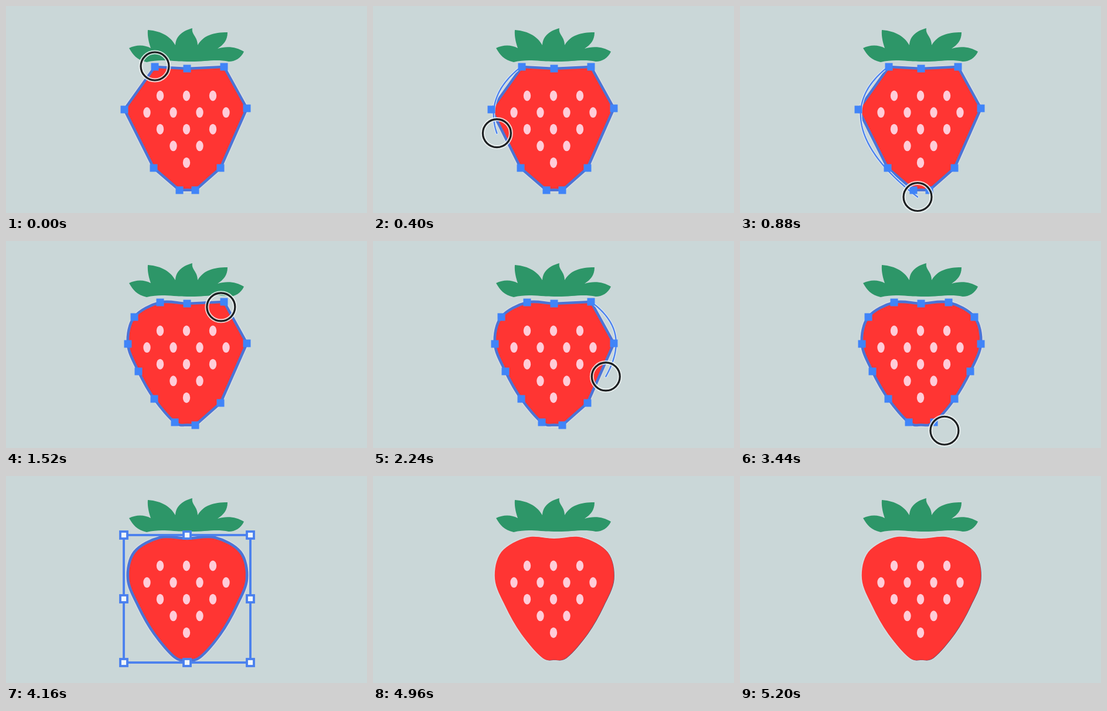
Write an HTML page with a canvas that moves like this. It is 616 by 354 pixels and loops after 5280 ms.

```html
<!DOCTYPE html>
<html lang="en">
<head>
<meta charset="utf-8">
<title>Smoothing a strawberry</title>
<style>
html, body { margin: 0; width: 100%; height: 100%; overflow: hidden; background: #cad7d8; }
canvas { display: block; width: 616px; height: 354px; filter: blur(0.6px); }
</style>
</head>
<body>
<canvas id="stage" width="616" height="354"></canvas>
<script>
const ctx = document.getElementById('stage').getContext('2d');
const LOOP = 5280, STEP = 80;
const PAPER = '#cad7d8', BLUE = '#4a80ee', RED = '#ff3533', GREEN = '#2d9668', SEED = '#ffccd8';

// Moments in the loop, in ms
const LEFT_DONE = 1040, RIGHT_DONE = 2960, BOX_ON = 4000, BOX_OFF = 4960;

// Cursor legs: eased travel along one cubic each
const leg = (start, end, ...curve) => ({ start, end, curve });
const sweepLeft = leg(0, 800, [254, 103], [160, 175], [218, 262], [303, 326.5]);
const goUp = leg(1120, 1600, [303, 326.5], [310, 230], [350, 140], [372, 104]);
const sweepRight = leg(1680, 2640, [372, 104], [455, 165], [405, 235], [326, 327]);
const leave = leg(3120, 3920, [326, 327], [317, 341], [380, 330], [645, 105]);
const legs = [sweepLeft, goUp, sweepRight, leave];

// Anchors run clockwise from the top centre; the smooth halves mirror each other
const TOP = [309, 107], BOTTOM = [309, 314.5];
const rough = {
  right: [[372, 104], [411, 175], [366, 277], [323, 315]],
  left: [[296, 315], [252, 277], [202, 177], [254, 104]]
};
const smoothRight = [[356, 105], [400, 130], [411, 176], [393, 223], [366, 270], [331, 310]];
const smooth = {
  right: smoothRight,
  left: smoothRight.map(([x, y]) => [619 - x, y]).reverse()
};

const leaves = new Path2D(`M210 72 C222 66 236 66 247 72 C244 63 241 52 242 41
  C267 43 281 53 289 67 C290 50 303 42 318 38 C316 49 327 52 327 67
  C337 50 354 45 378 45 C378 59 371 66 361 73 C377 68 393 70 406 78
  C401 89 391 95 380 95 C357 90 337 96 309 95 C283 95 265 90 240 96
  C223 92 217 84 210 72Z`);

function alongLeg({ start, end, curve: [a, b, c, d] }, t) {
  const p = Math.min(1, Math.max(0, (t - start) / (end - start)));
  const u = p * p * (3 - 2 * p), v = 1 - u;
  return [0, 1].map(i =>
    v * v * v * a[i] + 3 * v * v * u * b[i] + 3 * v * u * u * c[i] + u * u * u * d[i]);
}

function cursorAt(t) {
  return alongLeg(legs.findLast(l => t >= l.start), t);
}

function addCurve(path, pts) {
  for (let i = 0; i < pts.length - 1; i++) {
    const a = pts[i], b = pts[i + 1];
    // Level tangents where the two halves meet
    const before = pts[i - 1] || [2 * a[0] - b[0], b[1]];
    const after = pts[i + 2] || [2 * b[0] - a[0], a[1]];
    path.bezierCurveTo(
      a[0] + (b[0] - before[0]) / 6, a[1] + (b[1] - before[1]) / 6,
      b[0] - (after[0] - a[0]) / 6, b[1] - (after[1] - a[1]) / 6, ...b);
  }
}

function bodyPath(leftSmooth, rightSmooth) {
  const path = new Path2D();
  path.moveTo(...TOP);
  if (rightSmooth) addCurve(path, [TOP, ...smooth.right, BOTTOM]);
  else rough.right.forEach(p => path.lineTo(...p));
  path.lineTo(...BOTTOM);
  if (leftSmooth) addCurve(path, [BOTTOM, ...smooth.left, TOP]);
  else rough.left.forEach(p => path.lineTo(...p));
  path.closePath();
  return path;
}

function stroke(path, color, width) {
  ctx.strokeStyle = color;
  ctx.lineWidth = width;
  ctx.stroke(path);
}

function fill(path, color) {
  ctx.fillStyle = color;
  ctx.fill(path);
}

function drawSeeds() {
  ctx.fillStyle = SEED;
  [3, 4, 3, 2, 1].forEach((count, row) => {
    for (let i = 0; i < count; i++) {
      ctx.beginPath();
      ctx.ellipse(308 + 45 * (i - (count - 1) / 2), 153.5 + 28.6 * row, 6.2, 9, 0, 0, 7);
      ctx.fill();
    }
  });
}

function drawTrail(sweep, t) {
  const path = new Path2D();
  for (let s = sweep.start; s <= Math.min(t, sweep.end); s += 10) path.lineTo(...alongLeg(sweep, s));
  stroke(path, '#d8e6f1', 5);
  stroke(path, BLUE, 2.3);
}

function drawNodes(leftSmooth, rightSmooth) {
  const left = (leftSmooth ? smooth : rough).left;
  const right = (rightSmooth ? smooth : rough).right;
  ctx.fillStyle = '#4084f8';
  for (const [x, y] of [TOP, ...right, ...left]) ctx.fillRect(x - 6.5, y - 6.5, 13, 13);
}

function drawBox() {
  ctx.strokeStyle = BLUE;
  ctx.lineWidth = 3.8;
  ctx.strokeRect(201, 101, 216, 218);
  ctx.fillStyle = '#f1f7fb';
  for (const x of [201, 309, 417]) for (const y of [101, 210, 319]) {
    if (x === 309 && y === 210) continue;
    ctx.fillRect(x - 6, y - 6, 12, 12);
    ctx.strokeRect(x - 6, y - 6, 12, 12);
  }
}

function drawCursor([x, y]) {
  const ring = new Path2D();
  ring.arc(x, y, 24, 0, 7);
  stroke(ring, 'rgba(240,245,245,.8)', 7);
  stroke(ring, '#1d2022', 3.2);
}

function draw(t) {
  const leftSmooth = t >= LEFT_DONE, rightSmooth = t >= RIGHT_DONE;
  const editing = t < BOX_ON, selected = t < BOX_OFF;
  const body = bodyPath(leftSmooth, rightSmooth);

  ctx.fillStyle = PAPER;
  ctx.fillRect(0, 0, 616, 354);
  ctx.lineJoin = ctx.lineCap = 'round';
  fill(leaves, GREEN);

  stroke(body, '#d6dce0', selected ? 8 : 4);
  if (!selected) {
    ctx.save();
    ctx.translate(0.8, 0.6);
    fill(body, '#66556d');
    ctx.restore();
  }
  fill(body, RED);
  if (selected) stroke(body, '#4b74d6', 4.6);
  drawSeeds();

  ctx.lineJoin = 'miter';
  if (selected && !editing) drawBox();
  if (!editing) return;
  if (!leftSmooth) drawTrail(sweepLeft, t);
  if (t >= sweepRight.start && !rightSmooth) drawTrail(sweepRight, t);
  drawNodes(leftSmooth, rightSmooth);
  drawCursor(cursorAt(t));
}

const begin = performance.now();
function tick() {
  const t = Math.max(0, performance.now() - begin) % LOOP;
  draw(Math.floor(t / STEP) * STEP);
  requestAnimationFrame(tick);
}
tick();
</script>
</body>
</html>
```
